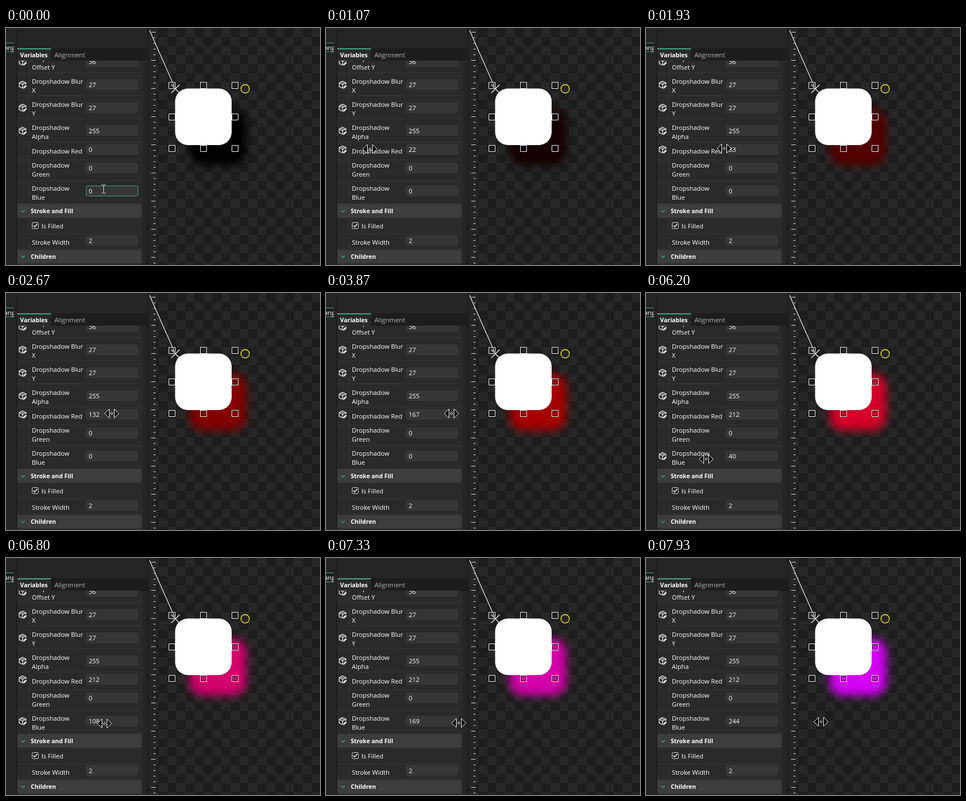
An HTML page with a canvas that plays this animation: 558x421 px, repeating every 8000 ms.

```html
<!DOCTYPE html>
<html lang="en">
<head>
<meta charset="utf-8">
<title>Drop shadow colour</title>
<style>
html, body { margin: 0; height: 100%; overflow: hidden; background: #252525; }
canvas { display: block; }
</style>
</head>
<body>
<canvas id="stage" width="558" height="421"></canvas>
<script>
const ctx = document.getElementById('stage').getContext('2d');
const LOOP = 8000, STEP = 200 / 3;
const RED_START = 733, RED_END = 5000, BLUE_START = 5600;

// pointer path: time, x, y
const path = [
  [0, 173, 286], [660, 60, 218], [733, 56, 216], [800, 56, 216],
  [1667, 127, 214], [1933, 139, 214], [2533, 178, 214], [3133, 221, 214],
  [3800, 221, 214], [3867, 223, 214], [4333, 249, 213], [4400, 249, 213],
  [4800, 263, 213], [5000, 268, 213], [5267, 190, 276], [5467, 67, 297],
  [5600, 67, 297], [6133, 94, 295], [6200, 107, 295], [7333, 236, 293],
  [7933, 310.9, 291], [8000, 311, 291]
];

function pointerAt(t) {
  const i = Math.max(1, path.findIndex(p => p[0] >= t));
  const [t0, x0, y0] = path[i - 1], [t1, x1, y1] = path[i];
  const k = (t - t0) / (t1 - t0);
  return { x: x0 + (x1 - x0) * k, y: y0 + (y1 - y0) * k };
}

function box(x, y, w, h, color) {
  ctx.fillStyle = color;
  ctx.fillRect(x, y, w, h);
}

function round(x, y, w, h, r, fill, stroke) {
  ctx.beginPath();
  ctx.roundRect(x, y, w, h, r);
  if (fill) { ctx.fillStyle = fill; ctx.fill(); }
  if (stroke) { ctx.strokeStyle = stroke; ctx.stroke(); }
}

function lines(d, color, width = 1, x = 0, y = 0, fill) {
  const p = new Path2D(d);
  ctx.save();
  ctx.translate(x, y);
  ctx.lineWidth = width;
  ctx.strokeStyle = color;
  if (fill) { ctx.fillStyle = fill; ctx.fill(p); }
  ctx.stroke(p);
  ctx.restore();
}

function text(s, x, y, color = '#fff', weight = 500, size = 11.2) {
  ctx.font = `${weight} ${size}px "Open Sans", "Noto Sans", sans-serif`;
  ctx.fillStyle = color;
  ctx.fillText(s, x, y);
}

function bold(s, x, y) {
  text(s, x, y, '#fff', 700, 10.6);
}

function field(value, y, focused) {
  round(142.5, y - 9.5, 92, 18, 3, '#363636', focused ? '#43a585' : '#363636');
  text(value, 147, y + 4);
}

function cubeIcon(y) {
  lines('M6-1V-3.5L0-6.5L-6-3.5V3L0 6M-6-3.5L0-.5L6-3.5M0-.5V6M-3-5L3-2', '#f0f0f0', 1.3, 29.5, y);
  lines('M1.5 6.5L2 4L5.5 .5L7 2L3.5 5.5Z', '#f0f0f0', 1, 29.5, y, '#f0f0f0');
}

function header(title, y) {
  round(20, y - 12, 221, 24, 2, '#3d3d3d');
  lines('M-3.5-1.5L0 2L3.5-1.5', '#43a585', 1.3, 30, y);
  bold(title, 44, y + 4);
}

function drawPanel(red, blue, focused) {
  box(0, 0, 251, 421, '#252525');
  box(18, 0, 2, 421, '#1e1e1e');
  box(20, 58, 223, 363, '#2a2a2a');

  ctx.save();
  ctx.beginPath();
  ctx.rect(20, 57, 223, 364);
  ctx.clip();
  for (const y of [79, 120, 161, 202, 234, 271, 312, 365, 391, 419]) box(20, y, 221, 1, '#363636');
  box(41, 58, 1, 255, '#333');
  box(41, 338, 1, 54, '#333');

  const rows = [
    ['Dropshadow|Offset Y', 58, 36, 60, 1],
    ['Dropshadow Blur|X', 99, 27, 101, 1],
    ['Dropshadow Blur|Y', 140, 27, 142, 1],
    ['Dropshadow|Alpha', 181, 255, 183, 1],
    ['Dropshadow Red', 223, red, 216, red],
    ['Dropshadow|Green', 248, 0, 249, 0],
    ['Dropshadow|Blue', 289, blue, 290, blue],
    ['Stroke Width', 385, 2, 378, 0]
  ];
  for (const [label, labelY, value, y, icon] of rows) {
    label.split('|').forEach((s, i) => text(s, 46, labelY + i * 16));
    field(value, y, focused && y === 290);
    if (icon) cubeIcon(y);
  }
  header('Stroke and Fill', 325);
  header('Children', 406);
  round(46.5, 345.5, 11, 11, 2, '#2a2a2a', '#d8d8d8');
  lines('M-3.5 0L-1 2.5L3.5-3', '#fff', 1.4, 52, 351);
  text('Is Filled', 63, 356);
  ctx.restore();

  box(20, 36, 231, 22, '#1d1d1d');
  box(20, 36, 60, 22, '#2a2a2a');
  box(20, 36, 60, 2, '#43a585');
  bold('Variables', 25, 52);
  text('Alignment', 86, 52, '#b8b8b8', 400, 11.5);

  ctx.save();
  ctx.beginPath();
  ctx.rect(0, 26, 14, 18);
  ctx.clip();
  round(-20.5, 26.5, 60, 16, 1, '#1f1f1f', '#43a585');
  text('ang', -3, 39);
  ctx.restore();
}

function drawCanvas(red, blue) {
  box(251, 0, 307, 421, '#1d1d1d');
  for (let row = 0; row < 27; row++)
    for (let col = row % 2; col < 20; col += 2)
      box(255 + col * 16, row * 16, 16, 16, '#272727');
  box(251, 0, 16, 421, '#252525');
  box(251, 0, 3, 421, '#1e1e1e');
  for (let i = 0; i < 42; i++) {
    const size = i % 5 ? 4 : 8;
    box(266 - size, 7 + i * 10, size, 1, '#d8d8d8');
  }

  ctx.save();
  ctx.shadowColor = `rgb(${red}, 0, ${blue})`;
  ctx.shadowOffsetX = 26;
  ctx.shadowOffsetY = 36;
  ctx.shadowBlur = 16;
  round(300.5, 107.5, 100.5, 100.5, 23, '#fff');
  ctx.restore();

  lines('M255 4L301 108M293.5 100.5L308.5 115.5M308.5 100.5L293.5 115.5', '#fff', 1.1);
  for (const x of [295, 351, 407])
    for (const y of [102, 158, 214]) {
      if (x === 351 && y === 158) continue;
      lines('M-4.5-4.5h9v9h-9z', '#000', 1, x, y);
      lines('M-5.5-5.5h11v11h-11z', '#fff', 1, x, y);
    }
  ctx.beginPath();
  ctx.arc(425, 108, 7.5, 0, Math.PI * 2);
  ctx.strokeStyle = '#f5ee22';
  ctx.lineWidth = 1.3;
  ctx.stroke();
  ctx.lineWidth = 1;
}

function drawPointer({ x, y }, dragging) {
  x = Math.round(x);
  y = Math.round(y);
  if (dragging || x < 142) {
    lines('M-12.5 0L-4.5-8V8ZM12.5 0L4.5-8V8Z', '#fff', 1, x, y, '#000');
    lines('M0-2L2 0L0 2L-2 0Z', '#fff', 1, x, y, '#000');
  } else if (x < 236) {
    lines('M-3-7.5H-1L.5-6.5L2-7.5H4M.5-6.5V6.5M-3 7.5H-1L.5 6.5L2 7.5H4', '#ddd', 1, x, y);
  } else {
    lines('M0 0V16L4 12.5L6.5 18L9 17L6.5 11.5H11.5Z', '#000', 1, x, y, '#fff');
  }
}

function draw(now) {
  const t = Math.floor((now % LOOP + 4) / STEP) * STEP % LOOP;
  const pointer = pointerAt(t);
  const draggingRed = t >= RED_START && t <= RED_END;
  const draggingBlue = t >= BLUE_START;
  const red = draggingRed ? Math.max(0, Math.round(pointer.x - 56)) : t > RED_END ? 212 : 0;
  const blue = draggingBlue ? Math.max(0, Math.round(pointer.x - 67)) : 0;

  drawPanel(red, blue, t < RED_START - 1);
  drawCanvas(red, blue);
  drawPointer(pointer, draggingRed || draggingBlue);
}

const start = performance.now();
function tick() {
  draw(performance.now() - start);
  requestAnimationFrame(tick);
}
tick();
</script>
</body>
</html>
```
